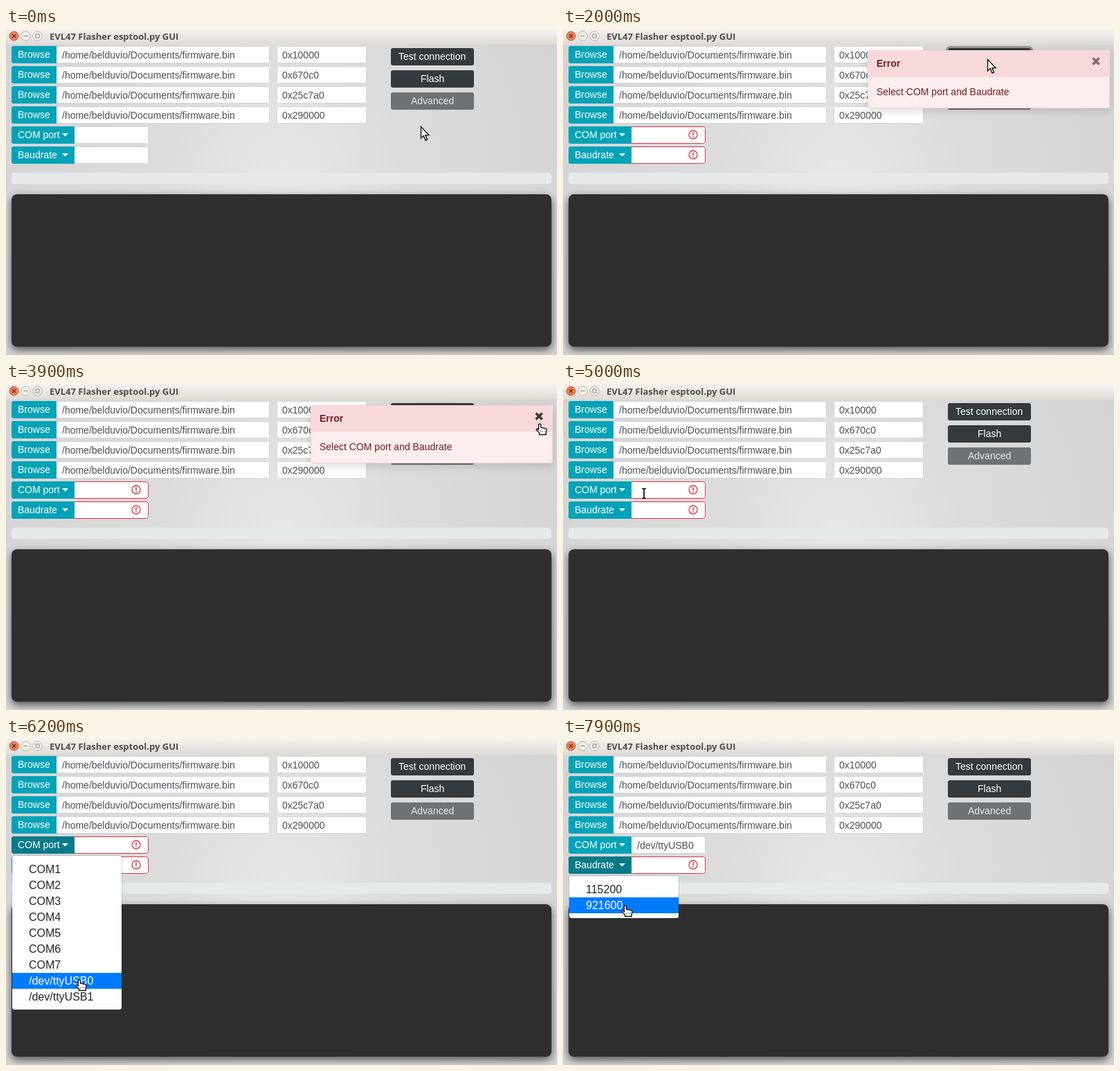
Animation of 796 by 472 pixels, one loop 8 s. Source, as an HTML page with a canvas:

```html
<!DOCTYPE html>
<html lang="en">
<head>
<meta charset="utf-8">
<title>Flasher GUI</title>
<style>
  html, body { margin: 0; width: 100%; height: 100%; overflow: hidden; background: #d6d6d6; }
  canvas { display: block; }
</style>
</head>
<body>
<canvas id="stage" width="796" height="472"></canvas>
<script>
const ctx = document.getElementById('stage').getContext('2d');
const LOOP = 8000, STEP = 100, FADE = 150;
const SANS = '"Liberation Sans", Arial, sans-serif';
const TEAL = '#04a2b6', TEAL_HOVER = '#058595', TEAL_OPEN = '#067a88';
const DARK = '#343a3e', DARK_HOVER = '#1f2527', RED = '#dc3545', INK = '#495057';
const BORDER = '#d0d5d9';

// Layout
const rowY = i => 26 + i * 29;
const actionY = i => 29 + i * 32;
const itemY = (menu, i) => menu.top + 8 + i * 23;
const ROW = 25, ITEM = 23, PORT_ROW = 4, BAUD_ROW = 5;
const range = n => Array.from({ length: n }, (_, i) => i);
const PORTS = [...range(7).map(i => 'COM' + (i + 1)), ...range(2).map(i => '/dev/ttyUSB' + i)];
const PORT_MENU = { top: rowY(PORT_ROW) + 28, items: PORTS };
const BAUD_MENU = { top: rowY(BAUD_ROW) + 28, items: ['115200', '921600'] };

// Moments of the clicks and what follows them
const PRESS_TEST = 1450, ICONS = 1700, TOAST_IN = 1850, BLUR = 3200, TOAST_OUT = 4250;
const PORT_OPEN = 5500, PORT_PRESS = 6200, PORT_SET = 6300, BAUD_OPEN = 7100, BAUD_PRESS = 7900;

// The pointer glides from one control to the next
const START = [599, 142];
const MOVES = [
  { from: 100, till: 1100, to: [614, actionY(0) + 15] },
  { from: 1900, till: 2600, to: [604, 64] },
  { from: 2600, till: 3400, to: [515, 158] },
  { from: 3400, till: 3900, to: [771, 59] },
  { from: 4300, till: 5000, to: [117, rowY(PORT_ROW) + 17] },
  { from: 5000, till: 5200, to: [86, rowY(PORT_ROW) + 18] },
  { from: PORT_OPEN, till: 6100, to: [106, itemY(PORT_MENU, 7) + 10] },
  { from: PORT_SET, till: 6900, to: [86, rowY(BAUD_ROW) + 13] },
  { from: BAUD_OPEN, till: 7700, to: [90, itemY(BAUD_MENU, 1) + 12] },
];

const ramp = (t, start, length = FADE) => Math.min(1, Math.max(0, (t - start) / length));
const ease = k => k * k * (3 - 2 * k);
const inside = (p, x, y, w, h) => p.x >= x && p.x < x + w && p.y >= y && p.y < y + h;

function pointerAt(t) {
  let [x, y] = START;
  for (const { from, till, to } of MOVES) {
    const k = ease(ramp(t, from, till - from));
    x += (to[0] - x) * k;
    y += (to[1] - y) * k;
  }
  return { x: Math.round(x), y: Math.round(y) };
}

function box(x, y, w, h, radius, fill, stroke) {
  ctx.beginPath();
  ctx.roundRect(x, y, w, h, radius);
  ctx.fillStyle = fill;
  ctx.fill();
  if (stroke) outline(x + .5, y + .5, w - 1, h - 1, radius, stroke);
}

function outline(x, y, w, h, radius, color, width = 1) {
  ctx.beginPath();
  ctx.roundRect(x, y, w, h, radius);
  ctx.strokeStyle = color;
  ctx.lineWidth = width;
  ctx.stroke();
}

function faded(alpha, draw) {
  if (!alpha) return;
  ctx.save();
  ctx.globalAlpha = alpha;
  draw();
  ctx.restore();
}

function shadowed(color, blur, dy, draw) {
  ctx.save();
  Object.assign(ctx, { shadowColor: color, shadowBlur: blur, shadowOffsetY: dy });
  draw();
  ctx.restore();
}

function label(text, x, y, color, font = '14px ' + SANS) {
  Object.assign(ctx, { font, fillStyle: color });
  ctx.fillText(text, x, y);
}

function line(color, width, ...segments) {
  ctx.beginPath();
  for (const [x0, y0, x1, y1] of segments) { ctx.moveTo(x0, y0); ctx.lineTo(x1, y1); }
  ctx.strokeStyle = color;
  ctx.lineWidth = width;
  ctx.stroke();
}

function cross(x, y, r, color, width) {
  line(color, width, [x - r, y - r, x + r, y + r], [x + r, y - r, x - r, y + r]);
}

function circle(x, y, r, stroke, fill, width = 1) {
  ctx.beginPath();
  ctx.arc(x, y, r, 0, 7);
  if (fill) { ctx.fillStyle = fill; ctx.fill(); }
  ctx.strokeStyle = stroke;
  ctx.lineWidth = width;
  ctx.stroke();
}

function drawWindow() {
  const page = ctx.createRadialGradient(400, 205, 0, 400, 205, 430);
  page.addColorStop(0, '#e7e7e8');
  page.addColorStop(.4, '#dcdcdd');
  page.addColorStop(1, '#d4d4d5');
  ctx.fillStyle = page;
  ctx.fillRect(0, 0, 796, 472);

  const bar = ctx.createLinearGradient(0, 0, 0, 24);
  bar.addColorStop(0, '#f6f4f2');
  bar.addColorStop(1, '#dfdad5');
  ctx.fillStyle = bar;
  ctx.fillRect(0, 0, 796, 24);
  circle(11.5, 11.5, 6.5, '#b5603f', '#ec8259');
  cross(11.5, 11.5, 2.5, '#6b301c', 1.4);
  circle(28.5, 11.5, 6.8, '#bcb6ae', '#efece8');
  line('#908a82', 1, [25.5, 11.5, 31.5, 11.5]);
  circle(45.5, 11.5, 6.8, '#bcb6ae', '#efece8');
  outline(43, 9, 5, 5, 0, '#908a82');
  label('EVL47 Flasher esptool.py GUI', 63, 17, '#534d48', 'bold 13px "Open Sans", sans-serif');
}

// A field whose left border lies under the button joined to it
function drawJoined(name, row, split, end, value, fill, { error = 0, focus = 0 } = {}) {
  const y = rowY(row), field = [split - 1, y, end - split + 1, ROW, [0, 3, 3, 0]];
  box(...field, '#fff', BORDER);
  faded(error, () => box(...field, '#fff', RED));
  label(value, split + 8, y + 18, INK);
  faded(focus, () => outline(6.5, y - 1.5, split - 5, ROW + 3, 4.5, 'rgba(23,162,184,.5)', 3));
  box(8, y, split - 8, ROW, [3, 0, 0, 3], fill);
  label(name, 17, y + 17, '#fff');
}

function drawFileRow(offset, row, p) {
  const y = rowY(row), hover = inside(p, 8, y, 65, ROW);
  drawJoined('Browse', row, 73, 381, '/home/belduvio/Documents/firmware.bin', hover ? TEAL_HOVER : TEAL);
  box(391, y, 130, ROW, 3, '#fff', BORDER);
  label(offset, 399, y + 18, INK);
}

function drawSelect(name, row, p, { value = '', icon, open, ...state }) {
  const y = rowY(row), hover = inside(p, 8, y, 91, ROW);
  drawJoined(name, row, 99, 206, value, open ? TEAL_OPEN : hover ? TEAL_HOVER : TEAL, state);
  ctx.beginPath();
  ctx.moveTo(81, y + 10);
  ctx.lineTo(90, y + 10);
  ctx.lineTo(85.5, y + 14.5);
  ctx.fill();
  if (icon) {
    circle(188, y + 12, 6, RED, null, 1.3);
    line(RED, 1.6, [188, y + 8.5, 188, y + 13], [188, y + 14, 188, y + 15.6]);
  }
}

function drawAction(text, y, hover) {
  const disabled = text === 'Advanced';
  box(556, y, 120, ROW, 3, disabled ? '#6e7275' : hover ? DARK_HOVER : DARK);
  ctx.font = '14px ' + SANS;
  const x = Math.round(616 - ctx.measureText(text).width / 2);
  label(text, x, y + 17, disabled ? '#e9e9ea' : '#fff');
}

function drawMenu(menu, p, pressed) {
  const height = menu.items.length * ITEM + 16;
  box(9, menu.top, 158, height - 1, 3, '#fff');
  outline(8.5, menu.top - .5, 159, height, 4, 'rgba(0,0,0,.15)');
  menu.items.forEach((item, i) => {
    const y = itemY(menu, i), hover = inside(p, 9, y, 158, ITEM), active = hover && pressed;
    if (hover) box(9, y, 158, ITEM, 0, active ? '#007bff' : '#f8f9fa');
    label(item, 33, y + 17, active ? '#fff' : '#212529', '16px ' + SANS);
  });
}

function drawToast(closeHover) {
  shadowed('rgba(0,0,0,.12)', 12, 4, () => box(440, 32, 350, 84, 4, '#fcedee', '#f3d3d6'));
  box(441, 33, 348, 37, [4, 4, 0, 0], '#f8d9db');
  line('#f5cdd1', 1, [441, 69.5, 789, 69.5]);
  label('Error', 453, 56, '#721c24', 'bold 14px ' + SANS);
  label('Select COM port and Baudrate', 453, 97, '#721c24');
  cross(770, 48, 4.5, closeHover ? '#3e3637' : '#7c6c6e', 3.4);
}

const ARROW = new Path2D('M.5 .5V17L4.3 13.5 7 20 9.6 19 6.9 12.6H12Z');
const HAND = new Path2D('M-1.6 1.2Q0-1.2 1.6 1.2V5.2L8.5 6.6Q10.3 7.2 10 9.2L9.2 12V15.5H-.5V13L-4.8 9Q-5.2 6.6-3 7.4L-1.6 8.6Z');

function drawPointer(kind, { x, y }) {
  ctx.save();
  ctx.translate(x, y);
  if (kind === 'text') {
    const beam = [[0, -6, 0, 7], [-3, -6.5, 3, -6.5], [-3, 7.5, 3, 7.5]];
    line('#fff', 4, ...beam);
    line('#000', 1.6, ...beam);
  } else {
    const shape = kind === 'hand' ? HAND : ARROW;
    ctx.fillStyle = '#fff';
    ctx.fill(shape);
    ctx.strokeStyle = '#111';
    ctx.lineWidth = 1.4;
    ctx.stroke(shape);
    if (kind === 'hand') line('#111', 1.2, ...range(3).map(i => [1 + i * 2.6, 11, 2.2 + i * 2.6, 11]));
  }
  ctx.restore();
}

function pointerKind(p, menu, toast, closeHover) {
  if (menu && inside(p, 8, menu.top, 160, menu.items.length * ITEM + 16)) return 'hand';
  if (toast && inside(p, 440, 32, 350, 84)) return closeHover ? 'hand' : 'arrow';
  for (const row of range(6)) {
    const y = rowY(row), file = row < PORT_ROW, split = file ? 73 : 99;
    if (inside(p, 8, y, split - 8, ROW)) return 'hand';
    if (inside(p, split, y, (file ? 381 : 206) - split, ROW)) return 'text';
    if (file && inside(p, 391, y, 130, ROW)) return 'text';
  }
  return range(2).some(i => inside(p, 556, actionY(i), 120, ROW)) ? 'hand' : 'arrow';
}

function draw(t) {
  const p = pointerAt(t);
  const toast = ramp(t, TOAST_IN) * (1 - ramp(t, TOAST_OUT));
  const closeHover = inside(p, 760, 38, 20, 23);
  const portSet = t >= PORT_SET, error = ramp(t, TOAST_IN);
  const menu = t >= BAUD_OPEN ? BAUD_MENU : t >= PORT_OPEN && !portSet ? PORT_MENU : null;
  const pressed = t >= BAUD_PRESS || (t >= PORT_PRESS && !portSet);

  drawWindow();
  ['0x10000', '0x670c0', '0x25c7a0', '0x290000'].forEach((offset, row) => drawFileRow(offset, row, p));
  drawSelect('COM port', PORT_ROW, p, {
    value: portSet ? PORTS[7] : '',
    icon: t >= ICONS && !portSet,
    error: portSet ? 0 : error,
    open: menu === PORT_MENU,
    focus: ramp(t, PORT_SET - 50) * (1 - ramp(t, BAUD_OPEN - FADE)),
  });
  drawSelect('Baudrate', BAUD_ROW, p, { icon: t >= ICONS, error, open: menu === BAUD_MENU });

  faded(ramp(t, PRESS_TEST) * (1 - ramp(t, BLUR)),
    () => outline(554.5, 27.5, 123, ROW + 3, 4.5, 'rgba(82,88,93,.5)', 3));
  ['Test connection', 'Flash', 'Advanced'].forEach((text, i) => {
    const y = actionY(i);
    drawAction(text, y, !toast && inside(p, 556, y, 120, ROW));
  });

  box(8, 209, 780, 16, 4, '#e6e9ea');
  shadowed('rgba(0,0,0,.62)', 12, 4.5, () => box(8, 240, 780, 220, 8, '#2f2f2f'));
  if (menu) drawMenu(menu, p, pressed);
  faded(toast, () => drawToast(closeHover));
  drawPointer(pointerKind(p, menu, toast, closeHover), p);
}

function frame() {
  draw(Math.floor(performance.now() % LOOP / STEP) * STEP);
  requestAnimationFrame(frame);
}
frame();
</script>
</body>
</html>
```
